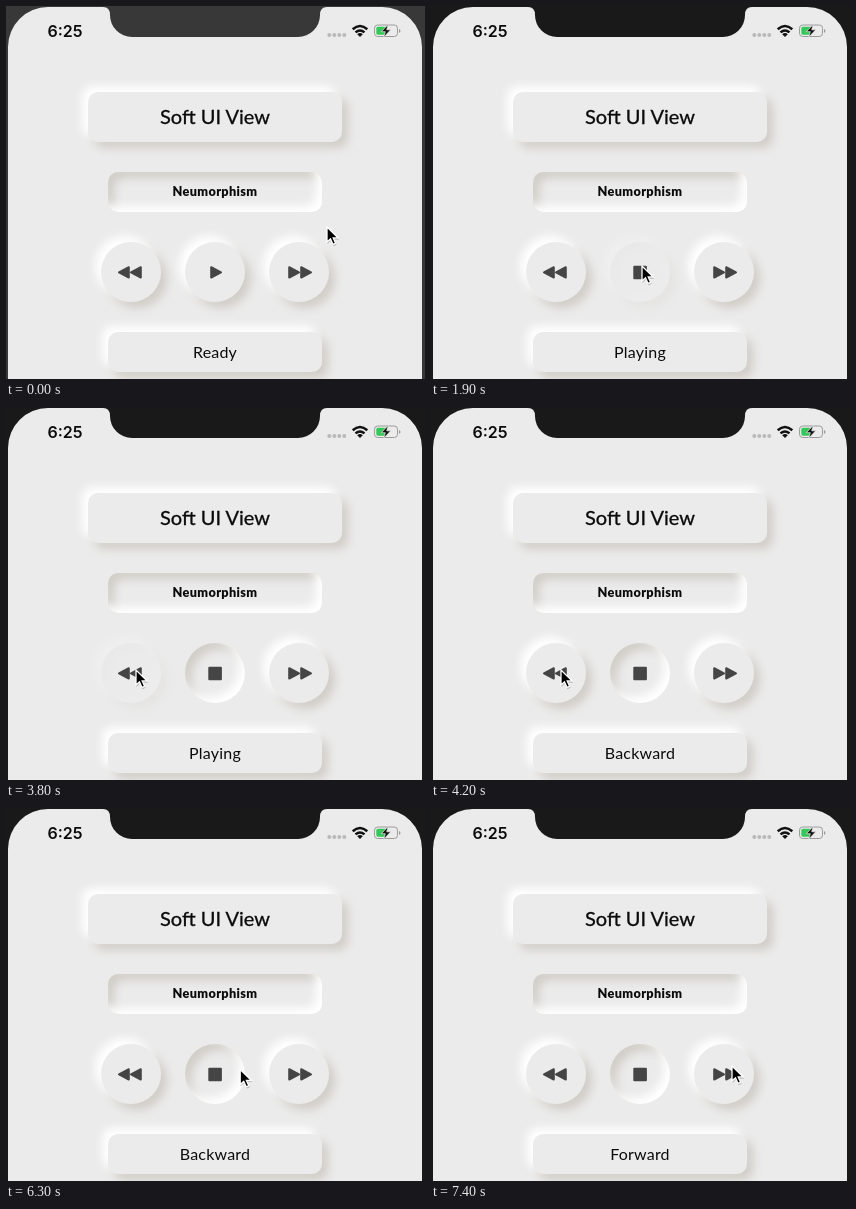
Write an HTML page that moves like this. It is 419 by 373 pixels and loops after 8000 ms.

```html
<!DOCTYPE html>
<html lang="en">
<head>
<meta charset="utf-8">
<title>Soft UI View</title>
<style>
  html, body { margin: 0; width: 100%; height: 100%; overflow: hidden; }
  #stage { position: relative; width: 419px; height: 373px; overflow: hidden; }
  svg { position: absolute; left: 0; top: 0; }
  .soft, .soft::before, .soft::after { position: absolute; box-sizing: border-box; border-radius: 10px; }
  .soft { --out: 1; --in: 0; background: #ebebeb; }
  .soft::before, .soft::after { content: ""; inset: 0; }
  .soft::before { box-shadow: -6px -6px 10px #fff, 6px 6px 10px #d1cdc7; opacity: var(--out); background: #ebebeb; }
  .soft::after { box-shadow: inset -6px -6px 10px #fff, inset 6px 6px 10px #d1cdc7; opacity: var(--in); }
  .round, .round::before, .round::after { border-radius: 50%; }
  .round { top: 236px; width: 60px; height: 60px; }
  .bar { left: 102px; width: 214px; height: 40px; }
  text { font-family: Lato, "Open Sans", sans-serif; text-anchor: middle; fill: #0b0b0b; }
  .clock { font: 600 16px Inter, Roboto, sans-serif; }
  .title { font-size: 20px; stroke: #0b0b0b; stroke-width: .3px; }
  .label { font-size: 12.7px; font-weight: 900; letter-spacing: .35px; }
  .status { font-size: 16px; letter-spacing: .2px; }
  .icon { fill: #454545; stroke: #454545; stroke-width: 2; stroke-linejoin: round; }
</style>
</head>
<body>
<div id="stage">
  <svg width="419" height="373">
    <path fill="#ebebeb" d="M2 373V41A40 40 0 0 1 42 1H97Q104 1 104 9A22 22 0 0 0 126 31H292A22 22 0 0 0 314 9Q314 1 321 1H376A40 40 0 0 1 416 41V373Z"/>
  </svg>

  <div class="soft" style="left:82px;top:86px;width:254px;height:50px"></div>
  <div class="soft bar" style="top:166px;--out:0;--in:1"></div>
  <div class="soft round" id="back" style="left:95px"></div>
  <div class="soft round" id="play" style="left:179px"></div>
  <div class="soft round" id="next" style="left:263px"></div>
  <div class="soft bar" style="top:326px"></div>

  <svg width="419" height="373">
    <defs>
      <path id="triangle" d="M-4.800 -5.200V5.200L5 0Z"/>
      <path id="arrow" d="M0 0V15L3.500 11.800L6 17.400L8.600 16.300L6.200 10.900H11Z"/>
    </defs>

    <text class="clock" x="59" y="30.500">6:25</text>
    <path d="M323.300 29h15.100" stroke="#b9b9b9" stroke-width="4" stroke-linecap="round" stroke-dasharray="0 5"/>
    <g fill="none" stroke="#111" stroke-width="2.500">
      <path d="M346.700 23.200Q354 16.700 361.300 23.200"/>
      <path d="M349.500 26.400Q354 22.500 358.500 26.400"/>
      <path fill="#111" stroke="none" d="M351.200 28.200Q354 26 356.800 28.200L354 31Z"/>
    </g>
    <rect x="368.500" y="19" width="23" height="11.500" rx="3.200" fill="none" stroke="#9b9b9b"/>
    <path d="M393 23v3.800q1.500-.5 1.500-1.900t-1.500-1.900" fill="#9b9b9b"/>
    <rect x="370.300" y="20.800" width="10" height="7.900" rx="1.600" fill="#35c759"/>
    <path d="M382.300 18.300L375.300 25.700H379.300L377.700 31.200L384.700 23.800H380.700Z" fill="#111" stroke="#ebebeb" stroke-width=".7"/>

    <text class="title" x="209" y="118">Soft UI View</text>
    <text class="label" x="209" y="190">Neumorphism</text>
    <text class="status" id="status" x="209" y="351.500"></text>

    <g class="icon" transform="translate(0 266.400)">
      <use href="#triangle" transform="translate(118 0) scale(-1 1)"/>
      <use href="#triangle" transform="translate(130 0) scale(-1 1)"/>
      <use href="#triangle" x="288"/>
      <use href="#triangle" x="300"/>
      <use href="#triangle" x="210" id="playIcon"/>
      <rect id="stopIcon" x="203.300" y="-5.700" width="11.600" height="11.600"/>
    </g>
    <g id="cursor">
      <use href="#arrow" x=".6" y="1.300" opacity=".2" stroke="#000"/>
      <use href="#arrow" stroke="#fff" stroke-width="1.300"/>
    </g>
  </svg>
</div>
<script>
const LOOP = 8000, STEP = 100, FADE = 250;
const $ = id => document.getElementById(id);

// Pointer moves: start and end time, then where the tip arrives
const home = { x: 321, y: 221 };
const moves = [
  { from: 200, to: 1100, x: 211, y: 260 },
  { from: 2500, to: 2850, x: 130, y: 263 },
  { from: 6000, to: 6800, x: 301, y: 258 }
];
// Touch and release times of each button; "play" latches
const taps = [
  { id: "play", down: 1900, up: Infinity, label: "Playing" },
  { id: "back", down: 3800, up: 4000, label: "Backward" },
  { id: "back", down: 5400, up: 5500, label: "Backward" },
  { id: "next", down: 7000, up: 7200, label: "Forward" }
];

const clamp = k => Math.min(1, Math.max(0, k));
const easeOut = k => 1 - (1 - k) ** 2;
const smooth = k => k * k * (3 - 2 * k);
const fade = dt => dt < 0 ? 0 : clamp((dt + STEP) / FADE);

function pointer(t) {
  let { x, y } = home;
  for (const m of moves) {
    const k = clamp((t - m.from) / (m.to - m.from));
    x += (m.x - x) * easeOut(k);
    y += (m.y - y) * smooth(k);
  }
  return `translate(${x} ${y})`;
}

function press(id, t) {
  const depth = taps.filter(tap => tap.id === id)
    .reduce((sum, tap) => sum + fade(t - tap.down) - fade(t - tap.up), 0);
  const style = $(id).style;
  style.setProperty("--out", (1 - depth) ** 3);
  style.setProperty("--in", depth ** 3);
}

function status(t) {
  const done = taps.filter(tap => t >= (tap.up === Infinity ? tap.down : tap.up));
  return done.length ? done[done.length - 1].label : "Ready";
}

function draw(t) {
  const playing = t >= taps[0].down;
  $("stage").style.background = playing ? "#191919" : "#383838";
  $("playIcon").style.display = playing ? "none" : "";
  $("stopIcon").style.display = playing ? "" : "none";
  $("status").textContent = status(t);
  ["back", "play", "next"].forEach(id => press(id, t));
  $("cursor").setAttribute("transform", pointer(t));
}

const start = performance.now();
function tick() {
  const t = (performance.now() - start) % LOOP;
  draw(Math.floor(t / STEP) * STEP);
  requestAnimationFrame(tick);
}
tick();
</script>
</body>
</html>
```
